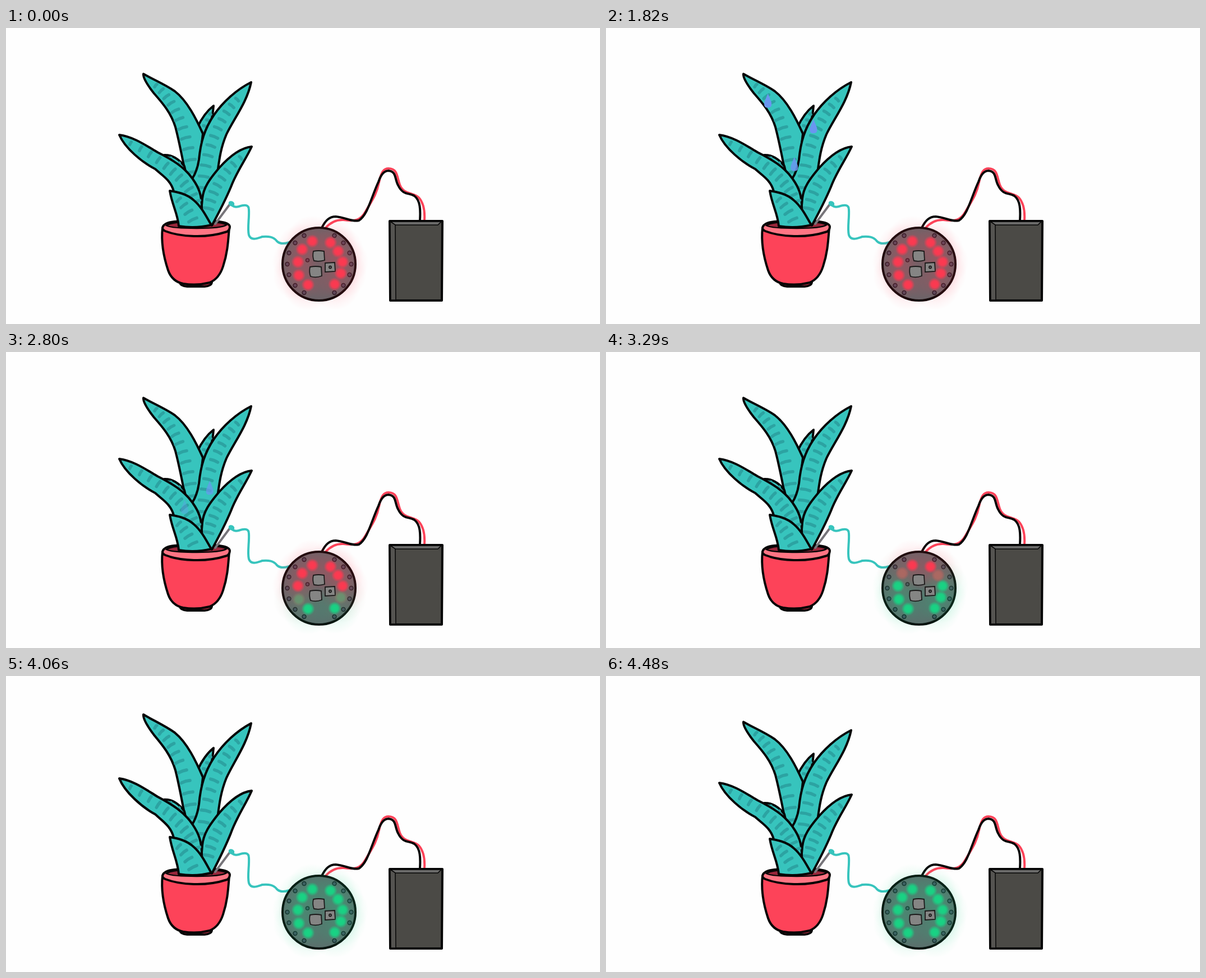
Animation of 1059x529 px, one loop 5.04 s. Source, as an HTML page:

```html
<!DOCTYPE html>
<html lang="en">
<head>
<meta charset="utf-8">
<title>Plant sensor</title>
<style>
html, body { margin: 0; width: 100%; height: 100%; overflow: hidden; background: #fefefe; }
svg { display: block; width: 100vw; height: 100vh; }
.ink { stroke: #050505; stroke-width: 4; stroke-linejoin: round; stroke-linecap: round; }
.line { fill: none; stroke-linecap: round; stroke-linejoin: round; }
.leaf { fill: #37c4bd; }
.stripe { stroke: #2ca3a2; stroke-width: 5.5; stroke-linecap: round; fill: none; }
</style>
</head>
<body>
<svg viewBox="0 0 1059 529">
  <defs>
    <radialGradient id="redCore"><stop offset="0" stop-color="#ff3850"/><stop offset=".5" stop-color="#ff3850" stop-opacity=".92"/><stop offset="1" stop-color="#ff3850" stop-opacity="0"/></radialGradient>
    <radialGradient id="greenCore"><stop offset="0" stop-color="#17d484"/><stop offset=".5" stop-color="#17d484" stop-opacity=".92"/><stop offset="1" stop-color="#17d484" stop-opacity="0"/></radialGradient>
    <radialGradient id="redHalo"><stop offset="0" stop-color="#ff3850" stop-opacity=".17"/><stop offset="1" stop-color="#ff3850" stop-opacity="0"/></radialGradient>
    <radialGradient id="greenHalo"><stop offset="0" stop-color="#17d484" stop-opacity=".17"/><stop offset="1" stop-color="#17d484" stop-opacity="0"/></radialGradient>
  </defs>

  <g id="potBack">
    <path class="ink" fill="#b92c43" d="M310 455Q311 461 323 462H354Q366 461 367 455Z"/>
    <path class="ink" fill="#fd4359" d="M279 357C276 385 282 412 289 433Q296 453 316 457Q340 461 363 455Q380 448 387 426C395 402 396 382 398 357Z"/>
    <path class="ink" fill="#ff7584" d="M279 357Q281 348 300 346Q340 342 380 346Q398 348 399 355Q399 361 394 364Q366 373 335 372Q304 371 284 363Q279 361 279 357Z"/>
    <path fill="#98263a" stroke="#050505" stroke-width="2.5" d="M286 353Q295 346 340 346Q386 346 393 352Q384 358 340 358Q296 358 286 353Z"/>
  </g>
  <path class="line" stroke="#77757a" stroke-width="4" d="M373 350L399 315"/>
  <g id="plant"></g>

  <path class="line" stroke="#37c4bd" stroke-width="4" d="M399 312C404 319 408 321 415 319C427 315 433 316 433 325C434 340 430 358 433 370C437 381 448 376 457 373C468 372 477 373 483 381Q490 388 505 383"/>
  <ellipse cx="402" cy="314" rx="5.5" ry="4.5" fill="#37c4bd" transform="rotate(28 402 314)"/>

  <path class="line" stroke="#fd4359" stroke-width="4" d="M570 357C578 348 588 342 602 343C622 346 632 344 641 328C652 309 661 297 665 276C669 256 674 251 682 251C698 251 697 266 702 280C709 299 727 293 736 303C744 312 747 326 746 343"/>
  <path class="line" stroke="#050505" stroke-width="4" d="M563 357C570 343 577 337 588 337C603 338 617 347 629 344C645 334 651 303 664 275C668 263 673 255 682 255C696 256 693 270 699 281C708 300 719 294 728 300C739 308 739 326 738 343"/>

  <path class="ink" fill="#4b4a46" d="M684 345H778L777 487H685Z"/>
  <path fill="#6b6b6a" stroke="#050505" stroke-width="1.5" d="M686 346H776L770 352H694Z"/>
  <path fill="#555451" stroke="#050505" stroke-width="1.5" d="M685 346L694 352L695 486H686Z"/>

  <circle class="ink" cx="558" cy="422" r="65" fill="#60676a"/>
  <g id="holes" fill="#44495a" stroke="#14161d" stroke-width="1.5"></g>
  <g id="halos"></g>
  <g fill="#858584" stroke="#1b1919" stroke-width="1.8">
    <path d="M548 399Q557 397 567 399L568 415Q558 418 549 416Q546 408 548 399Z"/>
    <path d="M542 427Q552 425 562 427L563 443Q553 447 543 444Q540 436 542 427Z"/>
    <path d="M569 420L586 419L587 435L569 436Z"/>
    <circle cx="578" cy="427.500" r="2"/>
  </g>
  <g id="cores"></g>
  <g id="drops" fill="#6a96f0"></g>
</svg>
<script>
const LOOP = 5040, STEP = 70;
const byId = id => document.getElementById(id);
const clamp = v => Math.max(0, Math.min(1, v));

function add(parent, tag, attrs) {
  const el = document.createElementNS("http://www.w3.org/2000/svg", tag);
  for (const k in attrs) el.setAttribute(k, attrs[k]);
  return parent.appendChild(el);
}

// Leaf outline, then midline (quadratic), stripe count, first and last stripe length
const leaves = [
  ["M370 139C357 149 347 165 341 178L350 202C363 183 368 164 370 139Z",
    [364, 154, 358, 171, 349, 186], 4, 4, 9],
  ["M245 82C260 91 282 100 301 113C323 130 339 162 351 189L345 240L331 280L321 264C315 237 309 203 302 177C294 151 278 133 264 117C253 103 244 89 245 82Z",
    [267, 103, 318, 145, 332, 258], 11, 8, 20],
  ["M282 227Q302 226 318 247L324 273L304 262Q296 239 282 227Z",
    [294, 233, 302, 237, 309, 242], 2, 3, 3],
  ["M437 97C411 110 387 132 371 155C354 180 347 204 344 235Q341 256 331 271L349 310L376 266C380 237 382 216 393 190C407 161 430 132 437 97Z",
    [412, 128, 361, 182, 350, 286], 11, 9, 19],
  ["M438 212C418 214 397 231 380 250C363 270 352 285 350 305L347 340L367 353C380 329 391 308 401 284C411 257 427 236 438 212Z",
    [418, 232, 372, 272, 361, 323], 8, 8, 18],
  ["M202 191C226 194 248 209 270 222C296 235 319 249 333 270C343 284 350 299 349 326L330 325L299 292C294 272 279 264 266 252C244 241 212 215 202 191Z",
    [222, 206, 315, 255, 338, 311], 11, 7, 18],
  ["M292 291C305 293 322 296 335 308C349 320 357 337 366 352Q337 359 308 354C306 331 296 316 292 291Z",
    [308, 307, 322, 321, 333, 343], 4, 11, 18]
];

function stripes([x0, y0, cx, cy, x1, y1], n, w0, w1) {
  let d = "";
  for (let i = 0; i < n; i++) {
    const t = i / (n - 1), s = 1 - t;
    const x = s * s * x0 + 2 * s * t * cx + t * t * x1;
    const y = s * s * y0 + 2 * s * t * cy + t * t * y1;
    const a = Math.atan2(s * (cy - y0) + t * (y1 - cy), s * (cx - x0) + t * (x1 - cx));
    const r = (w0 + (w1 - w0) * Math.sqrt(t)) / 2 - 1;
    const dx = Math.sin(a) * r, dy = -Math.cos(a) * r;
    d += `M${x - dx} ${y - dy}Q${x} ${y - 1.5} ${x + dx} ${y + dy}`;
  }
  return d;
}

const plant = byId("plant");
for (const [d, mid, n, w0, w1] of leaves) {
  add(plant, "path", { d, class: "leaf ink" });
  add(plant, "path", { d: stripes(mid, n, w0, w1), class: "stripe" });
}

for (const [dx, y] of [[27, 371], [43, 384], [54, 402], [57, 422], [54, 441], [43, 460], [27, 473]])
  for (const side of [-1, 1]) add(byId("holes"), "circle", { cx: 558.5 + side * dx, cy: y, r: 3.4 });
add(byId("holes"), "circle", { cx: 537.5, cy: 415, r: 3 });

// LED pairs, bottom to top
const pairs = [
  [[538.5, 459], [586, 458]],
  [[522, 442], [597, 438.5]],
  [[520.5, 418], [600, 418]],
  [[528, 395.5], [592, 399]],
  [[546, 381], [578.5, 383.5]]
].map(pair => {
  const lights = { red: [], green: [] };
  for (const [cx, cy] of pair)
    for (const c in lights)
      lights[c].push(
        add(byId("halos"), "circle", { cx, cy, r: 46, fill: `url(#${c}Halo)` }),
        add(byId("cores"), "circle", { cx, cy, r: 12, fill: `url(#${c}Core)` }));
  return lights;
});

// Start time, start x, end x, end y
const drops = [
  [1255, 333, 336, 263],
  [1565, 384, 358.5, 328],
  [1610, 278, 300.5, 290],
  [1995, 305, 318.5, 277],
  [2156, 353, 363.5, 250]
].map(([start, x0, x1, y1]) => ({
  start, x0, x1, y1,
  el: add(byId("drops"), "path", { d: "M0-13Q3-6 6 2Q8 11 2 12H-3Q-8 10-6 2Q-3-6 0-13Z" })
}));

function draw(t) {
  for (const { start, x0, x1, y1, el } of drops) {
    const p = (t - start) / 770, e = 1 - (1 - clamp(p)) ** 2;
    el.setAttribute("transform", `translate(${x0 + (x1 - x0) * e} ${-12 + (y1 + 12) * e})`);
    el.setAttribute("opacity", p < 0 ? 0 : clamp((1.25 - p) / 0.6));
  }
  pairs.forEach(({ red, green }, i) => {
    const k = clamp((t - 2380 - i * 280) / 280);
    for (const el of red) el.setAttribute("opacity", 1 - k);
    for (const el of green) el.setAttribute("opacity", k);
  });
  // quick stretch that settles slowly
  const u = clamp((t - 3920) / 560), s = 1 + 0.61 * u * (1 - u) ** 4;
  plant.setAttribute("transform", `translate(0 ${355 * (1 - s)}) scale(1 ${s})`);
}

const begin = performance.now();
function tick() {
  const t = (performance.now() - begin) % LOOP;
  draw(Math.floor(t / STEP) * STEP);
  requestAnimationFrame(tick);
}
draw(0);
requestAnimationFrame(tick);
</script>
</body>
</html>
```
